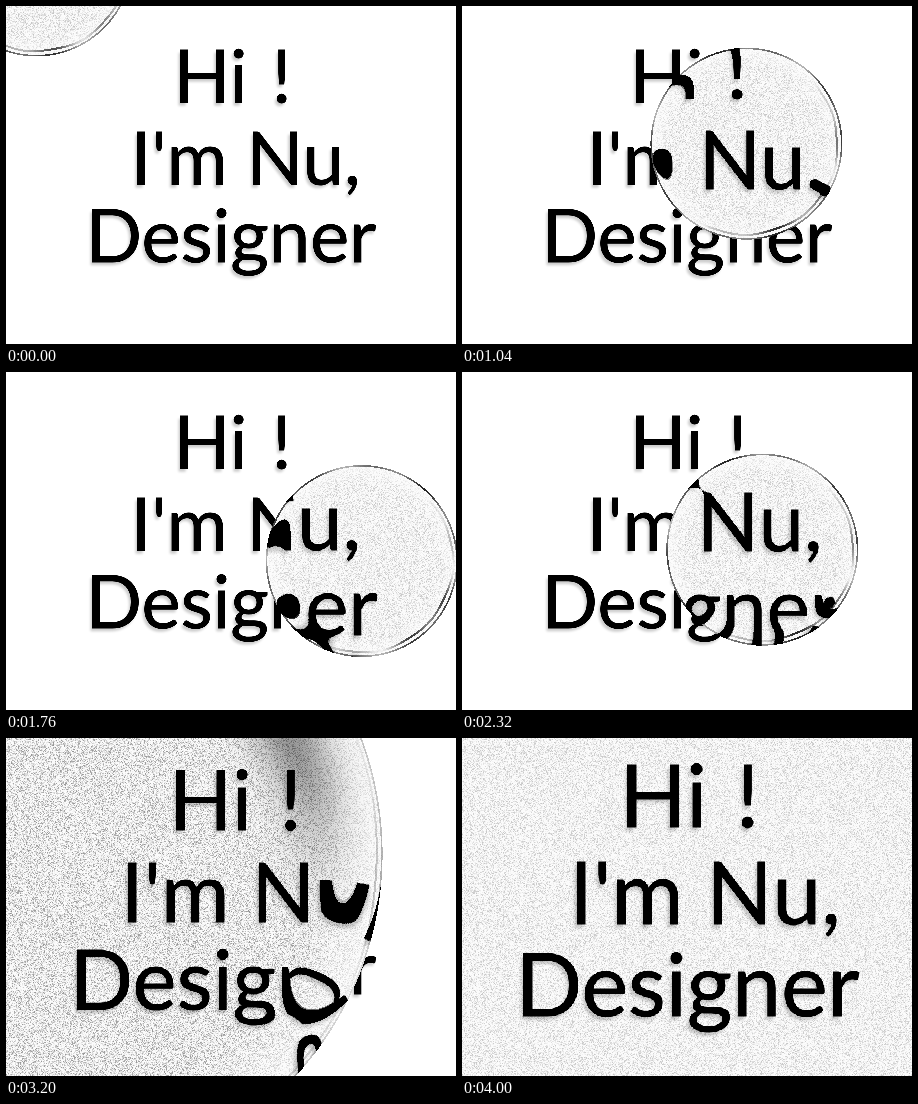
An HTML page with a canvas for the animation above (4800 ms loop, 450 by 338 pixels).

```html
<!DOCTYPE html>
<html lang="en">
<head>
<meta charset="utf-8">
<title>Hi !</title>
<style>
  html, body { margin: 0; width: 100%; height: 100%; overflow: hidden; background: #fff; }
  canvas { display: block; }
</style>
</head>
<body>
<canvas id="stage" width="450" height="338"></canvas>
<script>
const W = 450, H = 338, LOOP = 4800, STEP = 80, LAST = 3840;
const ctx = document.getElementById('stage').getContext('2d');
const image = ctx.createImageData(W, H);

const clamp = v => Math.max(0, Math.min(1, v));
const mix = (a, b, k) => a + (b - a) * k;
const span = (t, from, to) => clamp((t - from) / (to - from));
const easeOut = (u, n) => 1 - (1 - u) ** n;
const inOut = (u, n) => u < .5 ? (2 * u) ** n / 2 : 1 - (2 - 2 * u) ** n / 2;
const inOutSine = u => (1 - Math.cos(Math.PI * u)) / 2;

// The lettering is drawn once at double size and looked up through the lens.
const SCALE = 2;
const page = drawPage();

function drawPage() {
  const canvas = document.createElement('canvas');
  canvas.width = W * SCALE;
  canvas.height = H * SCALE;
  const c = canvas.getContext('2d', { willReadFrequently: true });
  c.fillStyle = '#fff';
  c.fillRect(0, 0, canvas.width, canvas.height);
  c.scale(SCALE, SCALE);
  c.font = '74px Lato, "Open Sans", sans-serif';
  c.fillStyle = c.strokeStyle = '#000';
  c.lineWidth = .6;
  const words = [['Hi', 168, 97], ['!', 266, 97], ["I'm", 125, 179], ['Nu,', 241, 179], ['Designer', 80, 256.5]];
  c.shadowColor = 'rgba(0,0,0,.2)';
  c.shadowOffsetX = -2 * SCALE;
  c.shadowOffsetY = 3 * SCALE;
  c.shadowBlur = 5;
  for (const word of words) c.fillText(...word);
  c.shadowColor = 'transparent';
  for (const word of words) {
    c.strokeText(...word);
    c.fillText(...word);
  }
  const rgba = c.getImageData(0, 0, canvas.width, canvas.height).data;
  return Uint8Array.from({ length: rgba.length / 4 }, (_, i) => rgba[i * 4]);
}

function inkAt(x, y) {
  const px = Math.floor((x + .5) * SCALE), py = Math.floor((y + .5) * SCALE);
  if (px < 0 || py < 0 || px >= W * SCALE || py >= H * SCALE) return 255;
  return page[py * W * SCALE + px];
}

let seed = 7;
const grain = Float32Array.from({ length: W * H }, () => {
  seed = (Math.imul(seed, 1664525) + 1013904223) >>> 0;
  return (seed / 2 ** 32) ** 3;
});

function lensAt(t) {
  const go = easeOut(span(t, 0, 2000), 2);
  const back = inOut(span(t, 2000, 2880), 3);
  const grow = inOut(span(t, 2800, 3680), 2);
  const settle = span(t, 2800, LAST);
  const x = mix(mix(30, 360, go), 47, back);
  const y = mix(mix(-46, 192, go), 115, back);
  const pull = easeOut(settle, 5);
  return {
    x, y, grow,
    r: mix(96, 660, grow),
    zoom: mix(1.1, 1.184, inOutSine(settle)),
    anchorX: mix(x, 223, pull),
    anchorY: mix(y, 138, pull)
  };
}

function throughLens(x, y, lens, dx, dy, dist, noise) {
  const rho = dist / lens.r;
  const angle = Math.atan2(dy, dx);
  const bevel = clamp((rho - .8) / .2);
  // The bevelled edge looks back inward, so the image folds over itself there.
  const shift = .2 * lens.r * bevel * bevel / (dist || 1);
  const ink = inkAt(
    lens.anchorX + (x - lens.anchorX) / lens.zoom - dx * shift,
    lens.anchorY + (y - lens.anchorY) / lens.zoom - dy * shift
  );

  const peak = 4 * lens.grow * (1 - lens.grow);
  const speckle = (.22 + .2 * peak) * (1 - .75 * bevel);
  const side = Math.max(0, Math.cos(angle + .5)) ** 10;
  const band = Math.exp(-(((rho - .8) / .1) ** 2));
  const shade = .01 + band * side * .4 * peak;

  const wobble = .5 + .5 * Math.sin(angle * 3 + 1) * Math.sin(angle * 7 + lens.x * .03);
  const depth = lens.r - dist;
  let rim = depth < 1.6 ? .25 + .6 * wobble : 0;
  const lower = Math.max(0, Math.cos(angle - .8));
  if (Math.abs(depth - 4 - 2 * wobble) < 1) rim = Math.max(rim, lower * wobble * .9);
  rim *= (1 - lens.grow) ** 2;

  return ink * (1 - shade) * (1 - speckle * noise) * (1 - rim);
}

function render(t) {
  const lens = lensAt(t);
  const data = image.data;
  for (let y = 0, i = 0; y < H; y++) {
    for (let x = 0; x < W; x++, i++) {
      const dx = x - lens.x, dy = y - lens.y;
      const dist = Math.hypot(dx, dy);
      const v = dist < lens.r
        ? throughLens(x, y, lens, dx, dy, dist, grain[i])
        : inkAt(x, y);
      data[i * 4] = data[i * 4 + 1] = data[i * 4 + 2] = v;
      data[i * 4 + 3] = 255;
    }
  }
  ctx.putImageData(image, 0, 0);
}

let shown = -1;
function tick() {
  const t = Math.min(LAST, Math.floor(performance.now() % LOOP / STEP) * STEP);
  if (t !== shown) render(shown = t);
  requestAnimationFrame(tick);
}
tick();
</script>
</body>
</html>
```
